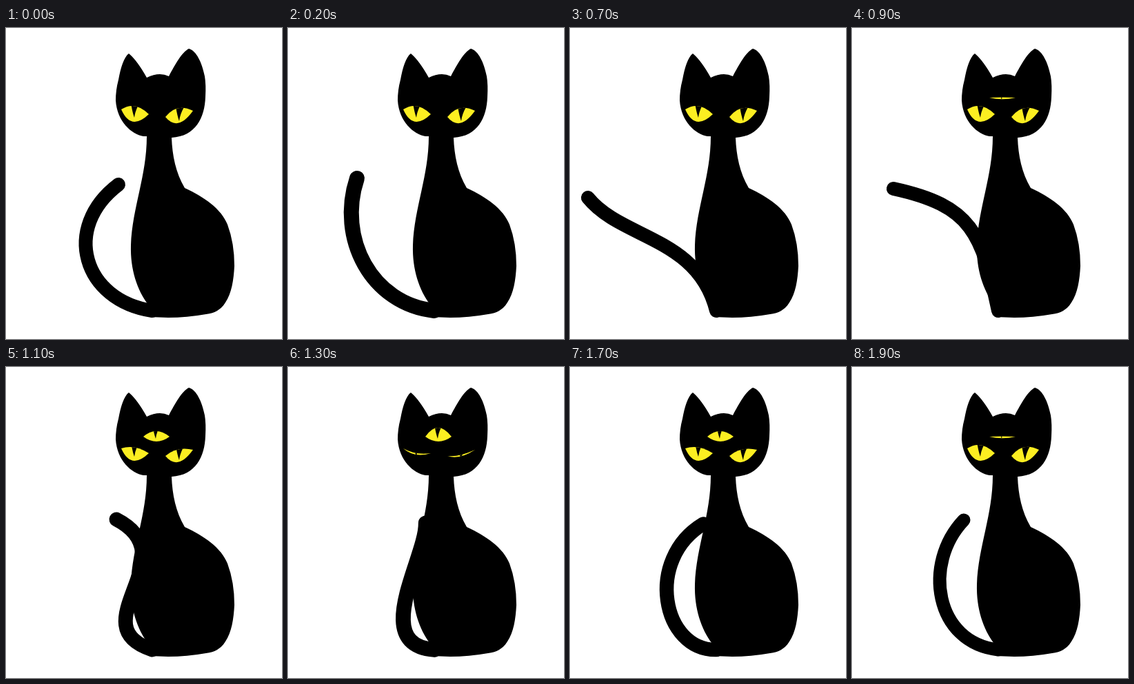
Animation, 400 px wide and 451 px high, one loop 2000 ms. Source, as an HTML page with a canvas:

```html
<!DOCTYPE html>
<html lang="en">
<head>
<meta charset="utf-8">
<title>Three-eyed cat</title>
<style>
  html, body { margin: 0; width: 100%; height: 100%; overflow: hidden; background: #fff; }
  canvas { display: block; }
</style>
</head>
<body>
<canvas id="stage" width="400" height="451"></canvas>
<script>
const ctx = document.getElementById('stage').getContext('2d');
const LOOP = 2000, STEP = 100;
const FUR = '#000', IRIS = '#fcee21';

const body = new Path2D(`M204 72 Q222 63 236 70 C245 53 255 35 265 30
  C276 33 284 50 288 70 Q290 82 289 100 C288 130 275 157 240 159
  C241 185 246 210 259 232 C287 245 312 262 321 285 Q331 312 331 345
  C330 365 327 385 318 398 Q309 413 290 415 Q262 420 235 420 L208 419 L206 401
  C190 380 180 350 181 315 C183 260 204 215 204 157 L199 157
  C182 154 161 136 159 105 Q159 90 163 75 C166 58 171 42 178 37 Q190 47 204 72Z`);

// The tail is one thick Bezier curve from a fixed base: two handles, tip, width
const tailBase = [212, 410];
const tailPoses = [
  { time: 0, shape: [112, 395, 80, 290, 163, 227, 20] },
  { time: 200, shape: [121, 400, 71, 305, 100, 218, 22] },
  { time: 400, shape: [130, 404, 62, 325, 38, 235, 24] },
  { time: 700, shape: [186, 303, 74, 306, 26, 246, 20] },
  { time: 900, shape: [188, 298, 175, 258, 60, 233, 20] },
  { time: 1100, shape: [105, 375, 265, 275, 160, 221, 21] },
  { time: 1500, shape: [140, 415, 125, 275, 214, 232, 22] },
  { time: 1900, shape: [120, 400, 102, 285, 162, 222, 19] }
];

// Corners, lid handles, pupil tip, and where the lids meet between the handles
const leftEye = { left: [167, 118], right: [207, 125], top: [187, 105], bottom: [181, 150], pupil: [186, 130], seam: .55 };
const rightEye = { left: [231, 129], right: [271, 120], top: [247, 108], bottom: [249, 151], pupil: [251, 135], seam: .57 };
const thirdEye = { left: [199, 101], right: [237, 101], top: [217, 75], bottom: [218, 115], pupil: [217, 104], seam: .7 };

const clamp = (v, low, high) => Math.min(high, Math.max(low, v));
const mix = (a, b, k) => a.map((v, i) => v + (b[i] - v) * k);

function tailAt(time) {
  const n = tailPoses.length;
  const current = tailPoses.findLastIndex(p => p.time <= time);
  const [a, b, c, d] = [-1, 0, 1, 2].map(offset => {
    const i = current + offset, pose = tailPoses[(i + n) % n];
    return { time: pose.time + Math.floor(i / n) * LOOP, shape: pose.shape };
  });
  const span = c.time - b.time, k = (time - b.time) / span;
  // Hermite easing keeps the swing smooth through every pose
  return b.shape.map((from, j) => {
    const to = c.shape[j];
    const m0 = (to - a.shape[j]) / (c.time - a.time) * span;
    const m1 = (d.shape[j] - from) / (d.time - b.time) * span;
    return from + k * (m0 + k * (3 * (to - from) - 2 * m0 - m1 + k * (2 * (from - to) + m0 + m1)));
  });
}

function drawTail(time) {
  const [x1, y1, x2, y2, tipX, tipY, width] = tailAt(time);
  ctx.beginPath();
  ctx.moveTo(...tailBase);
  ctx.bezierCurveTo(x1, y1, x2, y2, tipX, tipY);
  ctx.lineWidth = width;
  ctx.lineCap = 'round';
  ctx.strokeStyle = FUR;
  ctx.stroke();
}

function drawEye({ left, right, top, bottom, pupil, seam }, open) {
  if (!open) return;
  const shut = mix(top, bottom, seam);
  ctx.save();
  ctx.beginPath();
  ctx.moveTo(...left);
  ctx.quadraticCurveTo(...mix(shut, top, open), ...right);
  ctx.quadraticCurveTo(...mix(shut, bottom, Math.min(1, open * 2)), ...left);
  ctx.fillStyle = IRIS;
  ctx.fill();
  ctx.clip();
  ctx.translate(...pupil);
  ctx.beginPath();
  ctx.moveTo(-5, -22);
  ctx.quadraticCurveTo(-3, -8, 0, 0);
  ctx.quadraticCurveTo(1, -10, 8, -22);
  ctx.fillStyle = FUR;
  ctx.fill();
  ctx.restore();
}

function draw(now) {
  const time = Math.floor(now % LOOP / STEP) * STEP;
  ctx.fillStyle = '#fff';
  ctx.fillRect(0, 0, 400, 451);
  ctx.fillStyle = FUR;
  ctx.fill(body);
  drawTail(time);

  // The third eye opens around 1400 ms while the other two close
  const away = Math.abs(time - 1400);
  const side = clamp((away - 80) / 300, .07, 1);
  drawEye(leftEye, side);
  drawEye(rightEye, side);
  drawEye(thirdEye, clamp((540 - away) / 370, 0, 1));
}

let start;
function tick(now) {
  start ??= now;
  draw(now - start);
  requestAnimationFrame(tick);
}
draw(0);
requestAnimationFrame(tick);
</script>
</body>
</html>
```
